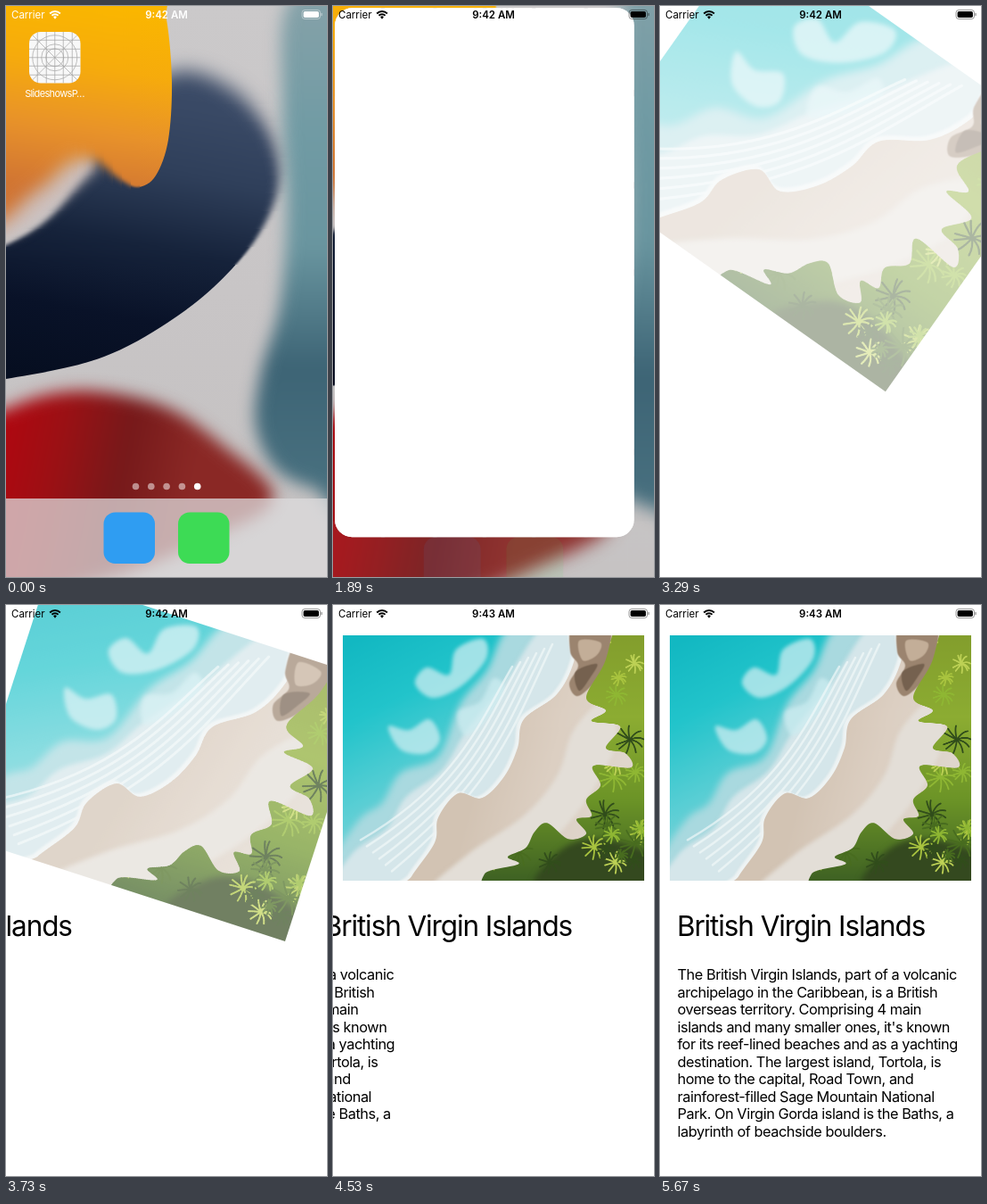
Write an HTML page with a canvas that moves like this. It is 360 px wide and 640 px high and loops after 5.69 s.

```html
<!DOCTYPE html>
<html lang="en">
<head>
<meta charset="utf-8">
<title>Island card</title>
<style>
html, body { margin: 0; width: 100%; height: 100%; overflow: hidden; background: #fff; }
body { font-family: Inter, "Liberation Sans", sans-serif; }
#stage { position: absolute; left: 0; top: 0; width: 360px; height: 640px; overflow: hidden; }
canvas { position: absolute; left: 0; top: 0; width: 360px; height: 640px; }
.t { position: absolute; white-space: pre; color: #000; }
#carrier, #clock { font-size: 11.5px; line-height: 14px; top: 3px; }
#carrier { left: 6px; }
#clock { left: 0; width: 360px; text-align: center; font-weight: 600; }
#label { left: 4.5px; width: 100px; top: 91px; text-align: center; color: #fff;
  font-size: 11px; line-height: 14px; letter-spacing: -.65px; }
#title { left: 19px; top: 340px; font-size: 31.5px; line-height: 40px; letter-spacing: -1.1px; }
#text { left: 19.5px; top: 405px; font-size: 16.32px; line-height: 19.5px; letter-spacing: -.45px; }
</style>
</head>
<body>
<div id="stage">
<canvas id="c"></canvas>
<div class="t" id="label">SlideshowsP…</div>
<div class="t" id="title">British Virgin Islands</div>
<div class="t" id="text">The British Virgin Islands, part of a volcanic
archipelago in the Caribbean, is a British
overseas territory. Comprising 4 main
islands and many smaller ones, it's known
for its reef-lined beaches and as a yachting
destination. The largest island, Tortola, is
home to the capital, Road Town, and
rainforest-filled Sage Mountain National
Park. On Virgin Gorda island is the Baths, a
labyrinth of beachside boulders.</div>
<div class="t" id="carrier">Carrier</div>
<div class="t" id="clock">9:42 AM</div>
</div>
<script>
const W = 360, H = 640, LOOP = 5690;
const STEPS = [0, 1500, 1670, 1780, 1890, 1990, 2090, 2200, 2430, 2550, 2660, 2770, 2880,
  2990, 3090, 3190, 3290, 3410, 3520, 3630, 3730, 3850, 3960, 4070, 4190, 4300, 4410, 4530,
  4650, 4750, 4870, 4980, 5090, 5210, 5320, 5430, 5550, 5670];
const $ = id => document.getElementById(id);
const clamp = (v, a = 0, b = 1) => Math.min(b, Math.max(a, v));
const mix = (a, b, p) => a + (b - a) * p;

function layer(w, h, scale) {
  const cv = document.createElement('canvas');
  cv.width = w * scale;
  cv.height = h * scale;
  const g = cv.getContext('2d');
  g.scale(scale, scale);
  return [cv, g];
}

// closed smooth curve through x,y pairs
function blob(p) {
  const path = new Path2D(), n = p.length / 2;
  const at = i => { i = (i + n) % n; return [p[2 * i], p[2 * i + 1]]; };
  path.moveTo(p[0], p[1]);
  for (let i = 0; i < n; i++) {
    const a = at(i - 1), b = at(i), c = at(i + 1), d = at(i + 2);
    path.bezierCurveTo(b[0] + (c[0] - a[0]) / 6, b[1] + (c[1] - a[1]) / 6,
      c[0] - (d[0] - b[0]) / 6, c[1] - (d[1] - b[1]) / 6, c[0], c[1]);
  }
  return path;
}

function ramp(g, x0, y0, x1, y1, colors) {
  const r = g.createLinearGradient(x0, y0, x1, y1);
  colors.forEach((c, i) => r.addColorStop(i / (colors.length - 1), c));
  return r;
}

function fill(g, path, style, blur = 0) {
  g.filter = blur ? `blur(${blur}px)` : 'none';
  g.fillStyle = style;
  g.fill(path);
  g.filter = 'none';
}

// fills in strips so that the blur can vary along one axis
function fillSoft(g, path, style, vertical, blurAt) {
  const end = vertical ? H : W, step = 10;
  for (let v = 0; v < end; v += step) {
    g.save();
    g.beginPath();
    vertical ? g.rect(0, v, W, step) : g.rect(v, 0, step, H);
    g.clip();
    fill(g, path, style, blurAt(v));
    g.restore();
  }
}

function makeWallpaper() {
  const [cv, g] = layer(W, H, 1);
  g.fillStyle = ramp(g, 0, 0, 0, H, ['#cbc9ca', '#c8c5c6', '#c4c1c1']);
  g.fillRect(0, 0, W, H);
  fill(g, blob([318, -5, 400, 0, 400, 542, 345, 540, 302, 518, 280, 470, 286, 410, 307, 335,
    315, 230, 310, 110]), ramp(g, 0, 0, 0, 540, ['#84a1a8', '#719ba4', '#69959f', '#3d6475', '#48707f']), 9);
  fillSoft(g, blob([-60, 290, 0, 268, 45, 240, 80, 198, 130, 120, 190, 74, 250, 91, 291, 135,
    306, 185, 296, 232, 262, 285, 200, 342, 110, 393, 0, 418, -80, 425]),
    ramp(g, 60, 80, 0, 410, ['#3a4a66', '#2f3f5a', '#16233b', '#091228', '#060e20']),
    true, y => clamp(11 * (1 - (y - 90) / 210), .6, 11));
  g.filter = 'blur(8px)';
  g.strokeStyle = '#cdbfbc';
  g.lineWidth = 22;
  g.beginPath();
  g.moveTo(-20, 252);
  g.bezierCurveTo(30, 240, 55, 205, 96, 172);
  g.stroke();
  g.filter = 'none';
  fillSoft(g, blob([-30, -40, 165, -40, 180, 15, 186, 85, 182, 150, 168, 190, 148, 203, 126, 193,
    98, 172, 70, 178, 35, 208, -30, 232]),
    ramp(g, 110, 0, 80, 210, ['#fab600', '#f6ab0c', '#e8922a', '#d07433']),
    false, x => clamp(12 * (1 - (x - 50) / 100), .6, 10));
  fill(g, blob([-40, 480, 0, 452, 55, 434, 110, 433, 180, 450, 240, 490, 300, 552, 220, 600,
    100, 645, -40, 660]), ramp(g, 0, 0, 300, 60, ['#bb0411', '#b3050f', '#9c1014', '#76191a', '#8a2825']), 9);
  return cv;
}

function makePhoto() {
  const [cv, g] = layer(338, 275.4, 2);
  g.translate(-11, -33.6);
  g.fillStyle = ramp(g, 20, 40, 130, 260, ['#12b8c2', '#22c4cb', '#57ced4', '#8fd6dc']);
  g.fillRect(11, 33, 338, 277);

  const foam = blob([205, 20, 172, 74, 142, 112, 118, 170, 76, 188, 55, 222, 30, 240, 0, 288,
    0, 330, 120, 330, 220, 200, 300, 20]);
  fill(g, foam, '#a9d9df', 8);
  fill(g, blob([240, 20, 190, 90, 150, 140, 122, 185, 82, 215, 60, 250, 20, 280, 0, 330,
    110, 330, 200, 200, 290, 20]), '#d5e6ea', 5);
  for (const p of [
    [105, 70, 130, 78, 138, 50, 168, 38, 172, 60, 145, 90, 112, 104, 92, 88],
    [62, 136, 85, 140, 108, 128, 120, 150, 105, 166, 76, 162],
    [140, 120, 165, 108, 180, 82, 192, 95, 170, 130, 148, 146]
  ]) fill(g, blob(p), 'rgba(205,236,240,.75)', 4);
  g.lineCap = 'round';
  for (let i = 0; i < 6; i++) {
    g.strokeStyle = 'rgba(245,250,251,.65)';
    g.lineWidth = 2.5;
    g.beginPath();
    g.moveTo(246 - i * 9, 44 + i * 5);
    g.bezierCurveTo(205 - i * 8, 130, 185 - i * 9, 200, 66 - i * 7, 298 - i * 7);
    g.stroke();
  }

  const shore = [272, 20, 266, 62, 247, 98, 210, 126, 203, 158, 188, 190, 163, 214, 136, 209,
    114, 236, 110, 264, 84, 302, 70, 330, 370, 330, 370, 20];
  fill(g, blob(shore), '#eef3f3', 2);
  g.translate(4, 2);
  fill(g, blob(shore), ramp(g, 150, 210, 300, 250, ['#d2c3b3', '#dccfc2', '#dfd6cc']));
  g.translate(-4, -2);
  fill(g, blob([305, 108, 318, 150, 290, 210, 240, 270, 180, 320, 105, 325, 150, 280, 215, 235,
    252, 190, 270, 140]), '#e3ded7', 5);
  fill(g, blob([270, 20, 310, 20, 306, 66, 292, 88, 274, 102, 265, 88, 275, 68, 266, 52]), '#9b846f', 1);
  fill(g, blob([276, 40, 300, 42, 296, 56, 280, 62]), '#c3ae98', 1);
  fill(g, blob([272, 75, 296, 66, 288, 82, 276, 96]), '#75614f', 1);

  const trees = new Path2D();
  trees.addPath(blob([322, 20, 304, 66, 284, 104, 306, 118, 290, 130, 322, 136, 306, 160, 328, 166,
    334, 182, 292, 180, 300, 202, 284, 218, 290, 236, 273, 240, 284, 256, 264, 262, 240, 244,
    226, 254, 216, 272, 196, 282, 208, 290, 170, 301, 190, 325, 370, 325, 370, 20]));
  fill(g, trees, ramp(g, 0, 34, 0, 309, ['#839e2d', '#8cac32', '#6c9427', '#3e6123']));
  g.save();
  g.clip(trees);
  fill(g, blob([255, 275, 300, 262, 360, 282, 360, 320, 230, 320]), '#34491f', 7);
  let seed = 7;
  const rnd = () => (seed = seed * 16807 % 2147483647) / 2147483647;
  const leaf = ['#a9c43f', '#486c1f', '#8fb733', '#314d1b', '#bdd155'];
  g.lineWidth = 1.8;
  for (let i = 0; i < 30; i++) {
    const x = mix(175, 349, Math.sqrt(rnd())), y = mix(34, 309, rnd()), r = mix(7, 17, rnd());
    g.strokeStyle = leaf[i % leaf.length];
    for (let k = 0; k < 10; k++) {
      const a = k * .63 + rnd() * .4;
      g.beginPath();
      g.moveTo(x, y);
      g.quadraticCurveTo(x + r * .6 * Math.cos(a), y + r * .6 * Math.sin(a) - 2,
        x + r * Math.cos(a + .2), y + r * Math.sin(a + .2));
      g.stroke();
    }
  }
  g.restore();
  return cv;
}

const dpr = Math.max(1, window.devicePixelRatio || 1);
const ctx = $('c').getContext('2d');
$('c').width = W * dpr;
$('c').height = H * dpr;
const wallpaper = makeWallpaper(), photo = makePhoto();

function rounded(x, y, w, h, r, style) {
  ctx.beginPath();
  ctx.roundRect(x, y, w, h, r);
  ctx.fillStyle = style;
  ctx.fill();
}

function appIcon(x, y, w, h, r, shade) {
  ctx.save();
  rounded(x, y, w, h, r, '#f8f8f8');
  ctx.clip();
  ctx.translate(x + w / 2, y + h / 2);
  ctx.scale(w / 57.5, h / 57.5);
  ctx.strokeStyle = '#a4a4a4';
  ctx.lineWidth = .7;
  ctx.beginPath();
  for (const d of [-19.5, -9.5, 0, 9.5, 19.5]) {
    ctx.moveTo(d, -29); ctx.lineTo(d, 29);
    ctx.moveTo(-29, d); ctx.lineTo(29, d);
  }
  for (const s of [-1, 1]) { ctx.moveTo(-29, -29 * s); ctx.lineTo(29, 29 * s); }
  for (const q of [10, 15, 25]) { ctx.moveTo(q, 0); ctx.arc(0, 0, q, 0, 7); }
  ctx.stroke();
  ctx.fillStyle = `rgba(0,0,0,${shade})`;
  ctx.fillRect(-30, -30, 60, 60);
  ctx.restore();
}

function home(p) {
  ctx.save();
  ctx.translate(180, 320);
  ctx.scale(1 + .12 * p, 1 + .12 * p);
  ctx.translate(-180, -320);
  ctx.drawImage(wallpaper, 0, 0, W, H);
  ctx.globalAlpha = 1 - p;
  ctx.fillStyle = 'rgba(222,220,221,.74)';
  ctx.fillRect(0, 552, W, 88);
  rounded(109.5, 567.5, 57.5, 57.5, 13, '#2f9df2');
  rounded(193, 567.5, 57.5, 57.5, 13, '#3ddb55');
  for (let i = 0; i < 5; i++) {
    ctx.beginPath();
    ctx.arc(145.5 + i * 17.3, 538.5, 3.8, 0, 7);
    ctx.fillStyle = i === 4 ? '#fff' : 'rgba(255,255,255,.5)';
    ctx.fill();
  }
  ctx.restore();
}

function statusBar(color) {
  ctx.strokeStyle = ctx.fillStyle = color;
  ctx.lineWidth = 2;
  for (const r of [8.2, 5]) {
    ctx.beginPath();
    ctx.arc(55, 14.2, r, -2.36, -.78);
    ctx.stroke();
  }
  ctx.beginPath();
  ctx.moveTo(55, 14.7);
  ctx.arc(55, 14.2, 2.7, -2.36, -.78);
  ctx.fill();
  ctx.globalAlpha = .4;
  ctx.lineWidth = 1;
  ctx.beginPath();
  ctx.roundRect(332, 4.5, 20.5, 10, 3);
  ctx.stroke();
  rounded(353.3, 7.7, 1.4, 3.6, .7, color);
  ctx.globalAlpha = 1;
  rounded(333.6, 6, 17.3, 7, 1.8, color);
  $('carrier').style.color = $('clock').style.color = color;
}

// cubic-bezier(.42, 0, 1, 1)
function easeIn(t) {
  t = clamp(t);
  let lo = 0, hi = 1;
  for (let i = 0; i < 30; i++) {
    const s = (lo + hi) / 2, q = 1 - s;
    if (1.26 * q * q * s + 3 * q * s * s + s * s * s < t) lo = s; else hi = s;
  }
  return lo * lo * (3 - 2 * lo);
}
const eased = (t, start) => easeIn((t - start) / 2000);

function launch(t) {
  if (t < 1670) return 0;
  if (t >= 2200) return 1;
  const u = (t - 1620) / 65;
  return 1 - (1 + u) * Math.exp(-u);
}

function draw(t) {
  const p = launch(t), inApp = p === 1;
  ctx.setTransform(dpr, 0, 0, dpr, 0, 0);
  ctx.fillStyle = '#fff';
  ctx.fillRect(0, 0, W, H);
  if (!inApp) {
    home(p);
    const box = [mix(26, 0, p), mix(29, 0, p), mix(57.5, W, p), mix(57.5, H, p), mix(13, 20, p)];
    appIcon(...box, t < 1500 ? 0 : .37 * (1 - p));
    if (p > 0) rounded(...box, `rgba(255,255,255,${clamp(p * 1.6)})`);
  } else {
    const k = eased(t, 2117), s = 1 + .414 * (1 - k);
    ctx.save();
    ctx.translate(180, 171.3);
    ctx.rotate((1 - k) * Math.PI / 3);
    ctx.scale(s, s);
    ctx.globalAlpha = k;
    ctx.drawImage(photo, -169, -137.7, 338, 275.4);
    ctx.restore();
  }
  statusBar(p > .5 ? '#000' : '#fff');
  $('label').style.opacity = clamp(1 - p * 2);
  $('clock').textContent = t < 4410 ? '9:42 AM' : '9:43 AM';
  slide('title', inApp, 355 * (eased(t, 2630) - 1));
  slide('text', inApp, 360 * (eased(t, 3627) - 1));
}

function slide(id, shown, dx) {
  $(id).style.visibility = shown ? 'visible' : 'hidden';
  $(id).style.transform = `translateX(${dx.toFixed(2)}px)`;
}

const begin = performance.now();
let last = -1;
function tick() {
  const now = (performance.now() - begin) % LOOP;
  let t = 0;
  for (const s of STEPS) if (s <= now) t = s;
  if (t !== last) draw(last = t);
  requestAnimationFrame(tick);
}
tick();
</script>
</body>
</html>
```
